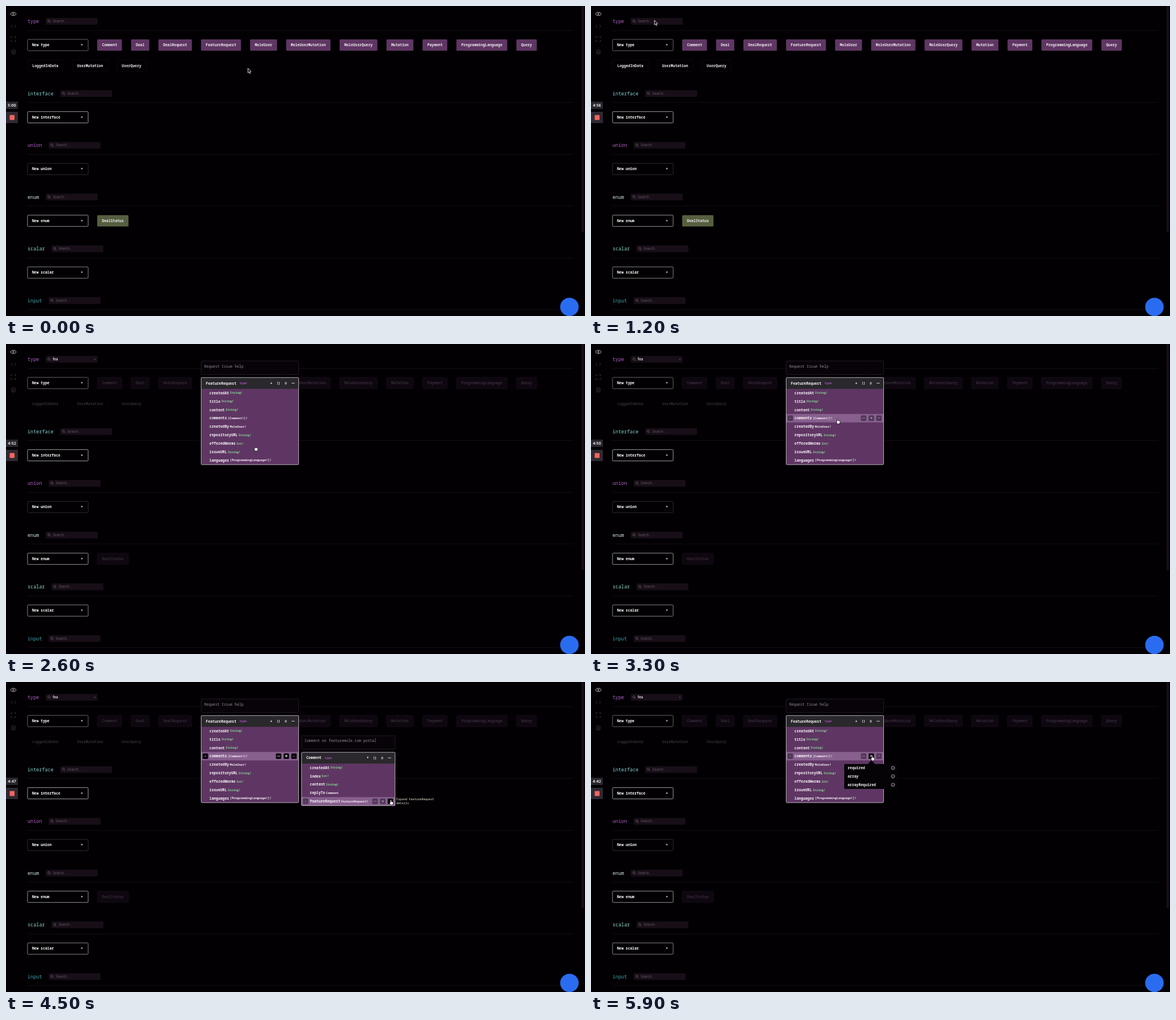
Animation, 1022 px wide and 548 px high, one loop 6 s. Source, as an HTML page with a canvas:

```html
<!DOCTYPE html>
<html lang="en">
<head>
<meta charset="utf-8">
<title>Schema explorer</title>
<style>
  html, body { margin: 0; width: 100%; height: 100%; overflow: hidden; background: #020003; }
  canvas { display: block; }
</style>
</head>
<body>
<canvas id="stage" width="1022" height="548"></canvas>
<script>
const ctx = document.getElementById('stage').getContext('2d');
const LOOP = 6000, STEP = 100;
const MONO = '"Noto Sans Mono", "DejaVu Sans Mono", monospace';
const SANS = 'Inter, "Open Sans", sans-serif';
const SIZE = 6.4, SMALL = 5.3, ADVANCE = 3.84, SMALL_ADVANCE = 3.18, ROW = 14.88;
const PURPLE = '#5f3663';

// name, y, heading colour, button border, node fill, filled nodes, outlined nodes
const sections = [
  ['type', 27, '#b362c8', '#777079', PURPLE,
    'Comment Deal DealRequest FeatureRequest MoleUser MoleUserMutation MoleUserQuery Mutation Payment ProgrammingLanguage Query',
    'LoggedInData UserMutation UserQuery'],
  ['interface', 154.7, '#8bd3d4', '#b5b1b5'],
  ['union', 246.2, '#b362c8', '#39303a'],
  ['enum', 337.7, '#cfe4dc', '#aaa8aa', '#555f40', 'DealStatus'],
  ['scalar', 429.2, '#94ded0', '#999699'],
  ['input', 520.7, '#3fa3ab', '#777377', '#0b5059',
    'CreateComment CreateDealRequest CreateFeatureRequest SignUp', 'UserBasicData'],
  ['directive', 612.2, '#d4c6d8', '#aaa8aa'],
];

const featureRequest = {
  name: 'FeatureRequest', doc: 'Request Issue help', width: 172,
  fields: ['createdAt String!', 'title String!', 'content String!', 'comments [Comment!]!',
    'createdBy MoleUser!', 'repositoryURL String!', 'offeredWorms Int!', 'issueURL String!',
    'languages [ProgrammingLanguage!]!'],
};
const comment = {
  name: 'Comment', doc: 'Comment on featuremole.com portal', width: 165,
  fields: ['createdAt String!', 'index Int!', 'content String!', 'replyTo Comment',
    'featureRequest FeatureRequest!'],
};

const scrollTrack = [[0, 0], [100, 12], [300, 125], [400, 155], [500, 150], [600, 109.7], [700, 0]];
const cursorTrack = [
  [0, 427, 110], [300, 421, 113], [600, 389, 120], [700, 372, 117], [1100, 112, 25],
  [2150, 112, 29], [2300, 375, 68], [2600, 440, 181], [2900, 440, 177], [3300, 435, 133],
  [3700, 505, 129], [4000, 505, 129], [4100, 545, 170], [4250, 660, 232], [4400, 679, 209],
  [5000, 679, 209], [5300, 506, 129], [5500, 506, 129], [5700, 496, 131],
];

function sample(track, t) {
  const next = track.findIndex(key => key[0] > t);
  if (next < 0) return track[track.length - 1].slice(1);
  const a = track[next - 1], b = track[next];
  let u = (t - a[0]) / (b[0] - a[0]);
  u = u * u * (3 - 2 * u);
  return a.slice(1).map((v, i) => v + (b[i + 1] - v) * u);
}

function text(str, x, y, color, { size = SIZE, weight = 600, font = MONO, align = 'left' } = {}) {
  ctx.font = `${weight} ${size}px ${font}`;
  ctx.textAlign = align;
  ctx.fillStyle = color;
  ctx.fillText(str, x, y + size * 0.35);
}

function box(x, y, w, h, fill, stroke, radius = 1.5) {
  ctx.beginPath();
  ctx.roundRect(x, y, w, h, radius);
  if (fill) { ctx.fillStyle = fill; ctx.fill(); }
  if (stroke) { ctx.strokeStyle = stroke; ctx.lineWidth = 0.9; ctx.stroke(); }
}

function line(points, color, width = 0.9, close = false) {
  ctx.beginPath();
  points.forEach(([x, y]) => ctx.lineTo(x, y));
  if (close) ctx.closePath();
  ctx.strokeStyle = color;
  ctx.lineWidth = width;
  ctx.stroke();
}

function circle(x, y, r, fill, stroke) {
  ctx.beginPath();
  ctx.arc(x, y, r, 0, Math.PI * 2);
  if (fill) { ctx.fillStyle = fill; ctx.fill(); }
  if (stroke) { ctx.strokeStyle = stroke; ctx.lineWidth = 0.8; ctx.stroke(); }
}

function dots(x, y, color) {
  ctx.fillStyle = color;
  for (const dx of [-2.5, -0.6, 1.3]) ctx.fillRect(x + dx, y - 0.6, 1.2, 1.2);
}

function searchBox(x, y, query) {
  box(x, y - 6, 91.5, 12, '#170e18');
  circle(x + 5.5, y - 0.6, 1.9, null, '#6b636c');
  line([[x + 6.9, y + 0.9], [x + 8.6, y + 2.6]], '#6b636c');
  if (query) {
    text(query, x + 12.3, y, '#f2eff2', { size: 6, font: SANS });
    text('×', x + 86.5, y, '#6b636c', { size: 5, align: 'center' });
  } else {
    text('Search...', x + 12.3, y, '#625a63', { size: 6, weight: 400, font: SANS });
  }
}

function nodes(section, query, selected) {
  const [name, top, , , fill, filled = '', outlined = ''] = section;
  let x = 161, y = top + 42;
  const draw = (label, color) => {
    const w = label.length * ADVANCE + 16.8;
    if (x + w > 1001) { x = 38; y += 36.3; }
    const matches = label.toLowerCase().includes(query);
    const dim = selected ? label !== 'FeatureRequest' : name === 'type' && !matches;
    if (color) box(x, y - 10, w, 20, dim ? '#0e0710' : color, dim ? '#150c17' : null);
    else box(x, y - 10, w, 20, null, dim ? '#070408' : '#120c13');
    text(label, x + 8.4, y, dim ? '#352b37' : '#eee9ef');
    x += w + 16.1;
  };
  filled.split(' ').filter(Boolean).forEach(label => draw(label, fill));
  outlined.split(' ').filter(Boolean).forEach(label => draw(label));
}

function drawSection(section, query, selected) {
  const [name, y, color, border] = section;
  text(name, 38, y, color, { size: 8.5, weight: 500 });
  searchBox(38 + name.length * 5.1 + 11.8, y, name === 'type' ? query : '');
  ctx.fillStyle = '#120c13';
  ctx.fillRect(38, Math.round(y + 15.7), 963, 1);
  box(38, y + 32, 107, 20, '#020003', border);
  text('New ' + name, 46, y + 42, '#fff');
  text('+', 134, y + 42, '#fff', { align: 'center', weight: 700 });
  nodes(section, query, selected);
}

function rowButtons(x, y, width, open, mouse) {
  const glyphs = ['•', '', 'M', open ? '-' : '+'];
  [7.3, width - 35.3, width - 21.7, width - 8.2].forEach((dx, i) => {
    const cx = x + dx;
    const active = open || Math.abs(mouse[0] + 1 - cx) < 5;
    const color = active ? '#f4f0f5' : '#a893ad';
    box(cx - 4.8, y - 4.8, 9.6, 9.6, active ? '#0b060c' : 'rgba(45,28,50,.6)');
    if (i === 1) dots(cx, y, color);
    else text(glyphs[i], cx, y, color, { size: SMALL, align: 'center' });
  });
}

function panel({ name, doc, width, fields }, x, y, mouse, openRow = -1) {
  const height = 20 + fields.length * ROW;
  box(x, y - 29.2, width, 24, '#080309', '#2a1b2c');
  text(doc, x + 5.5, y - 20, '#938b95', { weight: 500 });

  box(x, y, width, height, PURPLE);
  box(x, y, width, 20, '#2a282c');
  text(name, x + 8.3, y + 10, '#f5f2f5');
  text('type', x + 13.9 + name.length * ADVANCE, y + 10, '#a94fbd', { size: SMALL });
  const right = x + width;
  text('+', right - 48.3, y + 10, '#fff', { align: 'center', weight: 700 });
  text('[]', right - 35.6, y + 10, '#fff', { size: SMALL, align: 'center' });
  text('@', right - 22.7, y + 10, '#ddd', { size: SMALL, align: 'center' });
  dots(right - 9.8, y + 10, '#fff');

  const inside = mouse[0] > x && mouse[0] < right;
  const hovered = inside ? Math.floor((mouse[1] + 2 - y - 20) / ROW) : -1;
  fields.forEach((field, i) => {
    const [label, type] = field.split(' ');
    const cy = y + 27.2 + i * ROW;
    if (i === hovered || i === openRow) {
      ctx.fillStyle = '#87608e';
      ctx.fillRect(x, cy - ROW / 2, width, ROW);
      rowButtons(x, cy, width, i === openRow, mouse);
    }
    text(label, x + 14.6, cy, '#f7f3f8');
    text(type, x + 16.2 + label.length * ADVANCE, cy,
      /^(String|Int)/.test(type) ? '#86d695' : '#f1eaf3', { size: SMALL });
  });
  box(x, y, width, height, null, '#c4b9c8');
}

function menu() {
  ctx.beginPath();
  ctx.moveTo(495, 138); ctx.lineTo(502, 146); ctx.lineTo(488, 146);
  ctx.fillStyle = '#050306';
  ctx.fill();
  box(447, 145, 94, 44, '#050306');
  ['required', 'array', 'arrayRequired'].forEach((label, i) => {
    const y = 152 + i * ROW;
    text(label, 453, y, '#f5f2f5');
    circle(533, y, 3, null, '#c9c3cb');
    line([[531.6, y], [532.7, y + 1], [534.5, y - 1]], '#c9c3cb', 0.7);
  });
}

function sidebar(t) {
  const dim = '#3c373d', lit = '#c9c4ca';
  ctx.beginPath();
  ctx.ellipse(13, 14, 4.6, 2.9, 0, 0, Math.PI * 2);
  ctx.strokeStyle = lit;
  ctx.lineWidth = 0.9;
  ctx.stroke();
  circle(13, 14, 1.3, null, lit);
  for (const s of [-1, 1]) {
    line([[13 + s * 1.8, 33.5], [13 + s * 4.3, 36], [13 + s * 1.8, 38.5]], dim);
    for (const v of [-1, 1])
      line([[13 + s * 1.5, 58.5 + v * 4], [13 + s * 4, 58.5 + v * 4], [13 + s * 4, 58.5 + v * 1.5]], dim);
  }
  line([[13, 76.5], [17, 79], [13, 81.2], [9, 79]], dim, 0.9, true);
  for (const y of [81.2, 83.3]) line([[9, y], [13, y + 2.2], [17, y]], dim);

  const seconds = Math.round(300 - 3 * t / 1000);
  const clock = Math.floor(seconds / 60) + ':' + String(seconds % 60).padStart(2, '0');
  box(0, 169, 21, 13, '#29252d', null, 0);
  text(clock, 10.5, 175.5, '#fff', { size: 6.5, font: SANS, align: 'center' });
  box(0, 187, 21, 20, '#2e2832', null, 0);
  box(6.5, 192.8, 8.6, 8.6, '#f2645f', null, 1);
}

function arrow(x, y) {
  ctx.beginPath();
  for (const [dx, dy] of [[0, 0], [0, 8.2], [1.9, 6.6], [3.2, 9.4], [4.5, 8.8], [3.3, 6.1], [5.7, 6]])
    ctx.lineTo(x + dx, y + dy);
  ctx.closePath();
  ctx.fillStyle = '#111';
  ctx.fill();
  ctx.strokeStyle = '#e8e6e8';
  ctx.lineWidth = 0.9;
  ctx.stroke();
}

function hand(x, y, pointing) {
  box(x - 1.6, y + 2.6, 6, 5.4, '#fff', '#1a131c', 2);
  if (pointing) box(x - 0.6, y - 1, 1.9, 6, '#fff', '#1a131c', 1);
  box(x - 1, y + 3, 5, 4.4, '#fff', null, 1.8);
}

function render(t) {
  ctx.fillStyle = '#020003';
  ctx.fillRect(0, 0, 1022, 548);
  const [scroll] = sample(scrollTrack, t);
  const mouse = sample(cursorTrack, t);
  const query = 'fea'.slice(0, t < 1300 ? 0 : t < 1700 ? 1 : t < 2000 ? 2 : 3);
  const selected = t >= 2400;
  const commentOpen = t >= 4000 && t < 5400;
  const nestedOpen = t >= 4600 && t < 5100;

  ctx.save();
  ctx.translate(0, -scroll);
  sections.forEach(section => drawSection(section, query, selected));
  ctx.restore();

  if (selected) {
    const pointer = t < 2700 ? [0, 0] : mouse;
    panel(featureRequest, 344.5, 59.3, pointer, commentOpen ? 3 : -1);
    if (commentOpen) panel(comment, 521.7, 124.2, pointer, nestedOpen ? 4 : -1);
    if (nestedOpen) panel(featureRequest, 692, 204, pointer);
  }
  const tip = { size: SMALL, weight: 500 };
  if (t >= 3700 && t < 4000) {
    box(516.5, 125, 76, 12, '#020003');
    text('Expand Comment details', 518.5, 131, '#f2eff2', tip);
  }
  if (t >= 4400 && t < 4600) {
    text('Expand FeatureRequest', 689, 207.5, '#f0edda', tip);
    text('details', 689, 214.2, '#f0edda', tip);
  }
  if (t >= 5800) menu();

  sidebar(t);
  box(1016, scroll * 0.775, 4, 400, '#1b0e18', null, 2);
  circle(994.5, 532, 16.3, '#2a6cf0');

  if (t < 1300 || t >= 2150) {
    if (t < 2250) arrow(...mouse);
    else hand(...mouse, t >= 2900);
  }
}

function frame(now) {
  render(Math.floor(now % LOOP / STEP) * STEP);
  requestAnimationFrame(frame);
}
requestAnimationFrame(frame);
</script>
</body>
</html>
```
